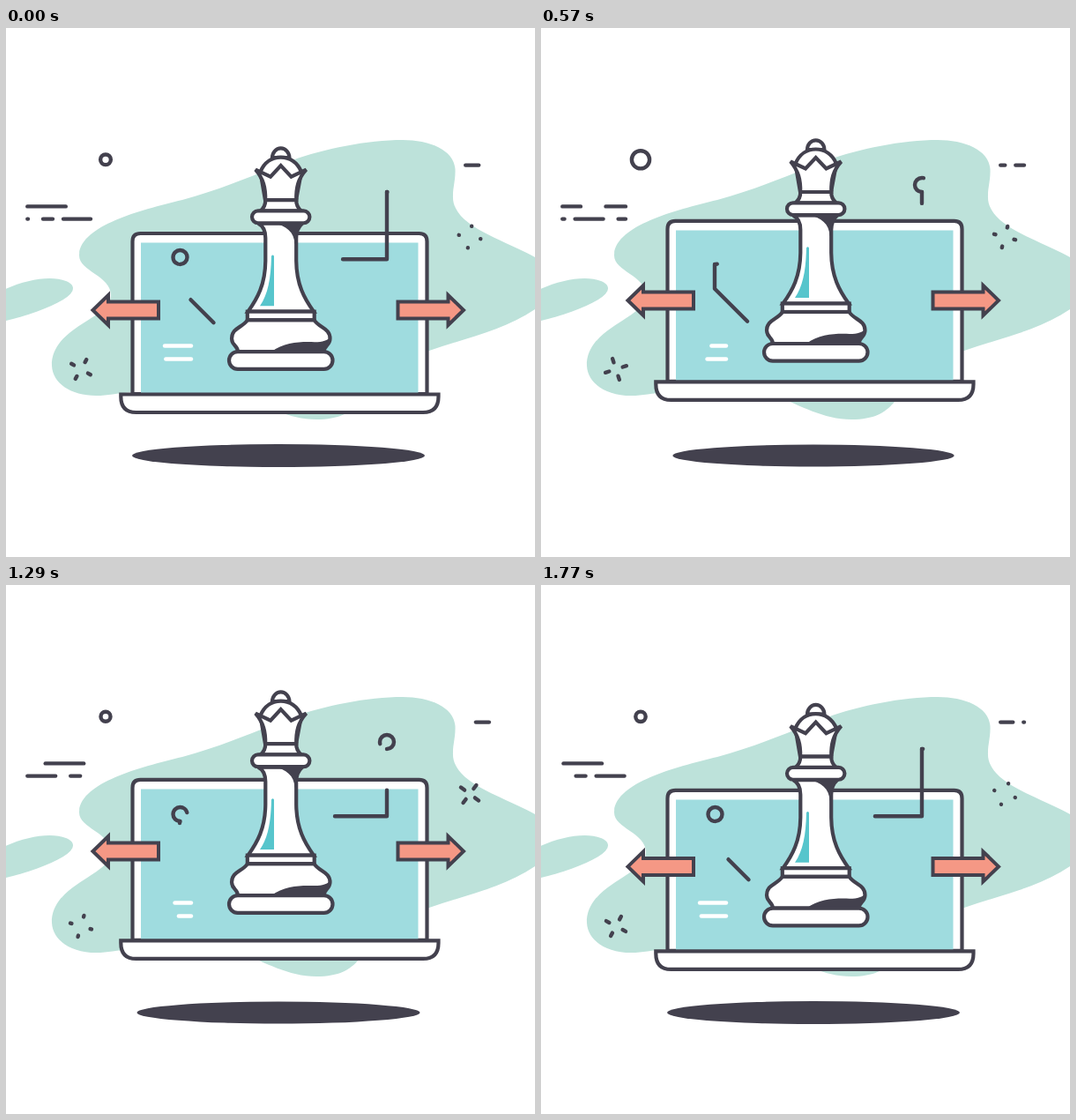
Animation of 600x600 px, one loop 1800 ms. Source, as an HTML page:

```html
<!DOCTYPE html>
<html lang="en">
<head>
<meta charset="utf-8">
<title>Chess queen on a floating laptop</title>
<style>
  html, body { margin: 0; height: 100%; overflow: hidden; background: #fff; }
  svg { display: block; width: 100vw; height: 100vh; }
  .ink { fill: none; stroke: #43414e; stroke-width: 4.4; stroke-linecap: round; stroke-linejoin: round; }
  .body { fill: #fff; stroke: #43414e; stroke-width: 4.2; }
  .dark { fill: #43414e; }
  .mint { fill: #bde2da; }
  .arrow { fill: #f59885; stroke: #43414e; stroke-width: 4; }
  .white { stroke: #fff; }
</style>
</head>
<body>
<svg viewBox="0 0 600 600">
  <path class="mint" d="M600 260C565 240 505 225 507 190C507 180 510 172 509.5 160C508 138 480 127 450 127C410 127 360 137 325 150C280 167 245 183 200 195C150 207 83 225 83 258C83 276 119 281 119 303C119 330 52 338 52 383C53 405 78 420 112 416.5C150 412 220 403 265 417C295 428 320 444 352 444C405 444 400 412 430 393C450 380 465 371 480 366C520 352 565 343 600 319Z"/>
  <path class="mint" d="M-5 298C20 286 50 280 68 287C80 292 78 300 65 308C48 318 20 328-5 333Z"/>
  <ellipse id="shadow" class="dark" cx="309" cy="485"/>

  <g id="laptop">
    <path class="body" d="M143.5 415V242Q143.5 233 152.500 233H468.500Q477.500 233 477.500 242V415Z"/>
    <path fill="#9fdcdf" d="M153 243.500H467.500V415H153Z"/>
    <path class="body" d="M130.300 415.500H490.500V418Q490.500 436 473 436H147.500Q130.300 436 130.300 418Z"/>
  </g>

  <path id="bar1" class="ink white"/>
  <path id="bar2" class="ink white"/>
  <path id="lineR" class="ink" pathLength="1" d="M373 262.300H432V186"/>
  <path id="ringR" class="ink" pathLength="1" d="M432 186a8 8 0 0 1 0-16a8 8 0 0 1 0 16"/>
  <path id="lineL" class="ink" pathLength="1" d="M235.500 334.200L197 295.700V268"/>
  <path id="ringL" class="ink" pathLength="1" d="M197.500 268a8 8 0 0 1 0-16a8 8 0 0 1 0 16"/>

  <g id="queen">
    <path class="body" d="M302 138a9.500 10.500 0 0 1 19.400 0Z"/>
    <path class="body" d="M288.500 154C293 143 302 137.500 311.700 137.500S330.500 143 335 154L329 186H294Z"/>
    <path class="body" d="M283 151.500L300 159.500L311.700 147L323.500 159.500L340.500 151.500C331 162 329 172 329.200 186H294.200C294.500 172 292 162 283 151.500Z"/>
    <path class="body" d="M294.200 186H329.200C329 192 331 195 335 198.500H288.500C292.500 195 294.500 192 294.200 186Z"/>
    <path class="body" d="M286 212.500C291 215 294.300 219 294.300 229V255C294 282 285 298 274.500 312.500H349C338.500 298 329.500 282 329.200 255V229C329.200 222 331 217 336 212.500Z"/>
    <path class="dark" d="M303 212H337C331 217 330 224 330 232L327.500 236C327 222 318 215 303 212Z"/>
    <path fill="#57c5cc" d="M304 249.500Q302.500 247 301 249.500C300.500 275 297 293 288 306H304Z"/>
    <path class="body" d="M274 322C268 331 256 331 256 343C256 351 263 351 263 358H360.500C360.500 351 367.500 351 367.500 343C367.500 331 355 331 349.500 322Z"/>
    <path class="dark" d="M301 358C316 346.500 336 346.500 350 347C359 347 365 345 368 341C368 351 361 351 361 358Z"/>
    <rect class="body" x="273.800" y="312.500" width="75.900" height="9.500"/>
    <rect class="body" x="279" y="198.300" width="65.400" height="13.800" rx="6.900"/>
    <rect class="body" x="253" y="358" width="117.500" height="19.700" rx="9.850"/>
  </g>

  <g id="arrows">
    <path id="arrow" class="arrow" d="M173 299.500H116V292L98.500 309L116 326V318.500H173Z"/>
    <use href="#arrow" transform="translate(617.500) scale(-1 1)"/>
  </g>

  <path id="dash1" class="ink" d="M24.300 202.400H96" stroke-dasharray="43.500 28.500"/>
  <path id="dash2" class="ink" d="M24.300 216.600H96" stroke-dasharray="11 12 32 17"/>
  <path id="dash3" class="ink" d="M521.200 155.600H548" stroke-dasharray="15 12"/>
  <circle id="ring" class="ink" cx="113" cy="149.300"/>
  <path id="sparkL" class="ink"/>
  <path id="sparkR" class="ink"/>
</svg>
<script>
const LOOP = 1800, STEP = 30;
const $ = id => document.getElementById(id);
const set = (id, attrs) => { for (const k in attrs) $(id).setAttribute(k, attrs[k]); };
const wave = (t, peak = 0, period = LOOP) => Math.cos((t - peak) / period * 2 * Math.PI);
const clamp = u => Math.min(1, Math.max(0, u));
const ease = u => (1 - Math.cos(Math.PI * clamp(u))) / 2;
const quart = u => u < .5 ? 8 * u ** 4 : 1 - 8 * (1 - u) ** 4;

// Draws a stroke on from its start, then wipes it off in the same direction.
function trim(id, t, begin, span) {
  const local = (t - begin + LOOP) % LOOP;
  const end = ease(local / span), start = ease((local - LOOP / 2) / span);
  set(id, {
    'stroke-dasharray': `${end - start} 2`,
    'stroke-dashoffset': -start,
    visibility: end - start > .002 ? 'visible' : 'hidden'
  });
}

const KEYS = [0, 270, 570, 870, 1110, 1470, 1770, 1800];
const TURN_L = [30, 64, 162, 211, 243, 329, 388, 390];
const TURN_R = [10, -45, -75, -144, -209, -258, -341, -350];

function keyed(t, values) {
  const i = KEYS.findIndex(k => k > t) - 1;
  const u = (t - KEYS[i]) / (KEYS[i + 1] - KEYS[i]);
  return values[i] + (values[i + 1] - values[i]) * u;
}

function spark(id, x, y, angle, length) {
  const b = 12.5, a = b - Math.max(.1, length);
  set(id, {
    d: `M${a} 0H${b}M${-a} 0H${-b}M0 ${a}V${b}M0 ${-a}V${-b}`,
    transform: `translate(${x} ${y}) rotate(${angle})`
  });
}

function draw(t) {
  const main = wave(t), late = wave(t, 120);
  set('laptop', { transform: `translate(0 ${10 * main - 10})` });
  set('queen', { transform: `translate(0 ${10 * late})` });
  set('arrows', { transform: `translate(0 ${12 * late})` });
  const rx = 161.5 + 4.5 * main;
  set('shadow', { rx, ry: rx * .078 });

  set('bar1', { d: `M${189.5 - 9.5 * main} 360.500H210` });
  set('bar2', { d: `M${189.5 - 9.5 * wave(t, 150)} 375.500H210` });

  trim('lineR', t, 750, 900);
  trim('ringR', t, 150, 800);
  trim('lineL', t, 1380, 900);
  trim('ringL', t, 780, 800);

  set('dash1', { 'stroke-dashoffset': .04 * t });
  set('dash2', { 'stroke-dashoffset': -17.7 - .08 * t });
  set('dash3', { 'stroke-dashoffset': -.03 * t });

  const swing = ((t + 300) % LOOP) / 900;
  set('ring', { r: 5.4 + 4.7 * quart(swing < 1 ? swing : 2 - swing) });
  spark('sparkL', 85, 387, keyed(t, TURN_L), 2.9 - 2.5 * wave(t, 250, 900));
  spark('sparkR', 526, 237, keyed(t, TURN_R), 2.2 + 3.3 * wave(t, 320, 900));
}

const begin = performance.now();
function tick() {
  draw(Math.floor((performance.now() - begin) % LOOP / STEP) * STEP);
  requestAnimationFrame(tick);
}
tick();
</script>
</body>
</html>
```
